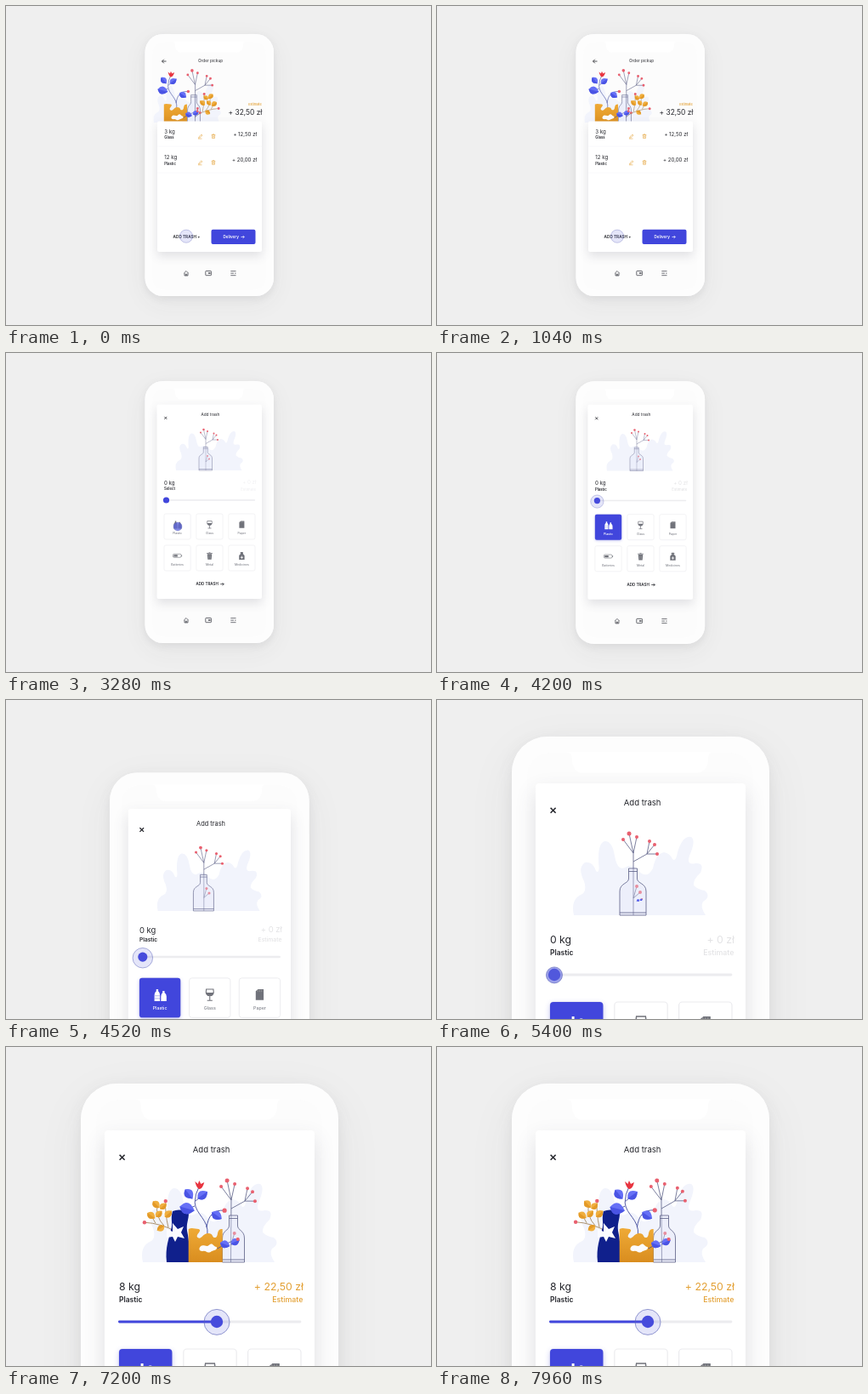
Write an HTML page with a canvas that moves like this. It is 500 px wide and 375 px high and loops after 8000 ms.

```html
<!DOCTYPE html>
<html lang="en">
<head>
<meta charset="utf-8">
<title>Add trash</title>
<style>
html, body { margin: 0; width: 100%; height: 100%; overflow: hidden; background: #efefef; }
canvas { display: block; width: 500px; height: 375px; }
</style>
</head>
<body>
<canvas id="stage"></canvas>
<script>
const LOOP = 8000;
const BLUE = '#4146dc', ORANGE = '#e3a034', INK = '#25262c', LINE = '#5b5f86', RED = '#e9606f';
const canvas = document.getElementById('stage');
const ctx = canvas.getContext('2d');
const dpr = Math.max(1, window.devicePixelRatio || 1);
canvas.width = 500 * dpr;
canvas.height = 375 * dpr;

let zoom = 1;

const clamp = v => Math.max(0, Math.min(1, v));
const lerp = (a, b, p) => a + (b - a) * p;
const ramp = (t, from, to) => clamp((t - from) / (to - from));
const quad = p => p < .5 ? 2 * p * p : 1 - 2 * (1 - p) * (1 - p);
const sine = p => (1 - Math.cos(Math.PI * p)) / 2;
const outCubic = p => 1 - Math.pow(1 - p, 3);

function group(x, y, scale, draw, alpha = 1, angle = 0) {
  if (alpha <= 0 || scale === 0) return;
  ctx.save();
  ctx.translate(x, y);
  ctx.rotate(angle);
  ctx.scale(scale, scale);
  ctx.globalAlpha *= alpha;
  draw();
  ctx.restore();
}

const faded = (alpha, draw) => group(0, 0, 1, draw, alpha);

function box(x, y, w, h, r, fill, stroke, width = .5) {
  ctx.beginPath();
  ctx.roundRect(x, y, w, h, r);
  if (fill) { ctx.fillStyle = fill; ctx.fill(); }
  if (stroke) { ctx.strokeStyle = stroke; ctx.lineWidth = width; ctx.stroke(); }
}

function shadowBox(x, y, w, h, r, fill, blur, dy, color) {
  ctx.save();
  ctx.shadowColor = color;
  ctx.shadowBlur = blur * zoom * dpr;
  ctx.shadowOffsetY = dy * zoom * dpr;
  box(x, y, w, h, r, fill);
  ctx.restore();
}

const card = (x, y, w) => shadowBox(x, y, w, 289 - y, 2, '#fff', 12, 5, 'rgba(70,70,90,.15)');

function dot(x, y, r, fill) {
  ctx.beginPath();
  ctx.arc(x, y, r, 0, Math.PI * 2);
  ctx.fillStyle = fill;
  ctx.fill();
}

function path(d, fill, stroke, width = .8) {
  const p = new Path2D(d);
  if (fill) { ctx.fillStyle = fill; ctx.fill(p); }
  if (stroke) { ctx.strokeStyle = stroke; ctx.lineWidth = width; ctx.stroke(p); }
}

function text(str, x, y, size, color = INK, align = 'left', weight = 400) {
  ctx.font = `${weight} ${size}px Inter, Roboto, sans-serif`;
  ctx.textAlign = align;
  ctx.textBaseline = 'middle';
  ctx.fillStyle = color;
  ctx.fillText(str, x, y);
}

// ---- illustration, ground at y = 0 ----

function leaf(x, y, angle, len, color, shade) {
  group(x, y, len / 10, () => {
    path('M-5 0Q-1 -7.5 5 0Q-1 7.5 -5 0Z', color);
    path('M-5 0Q-1 7.5 5 0Z', shade);
  }, 1, angle);
}

const blueLeaf = (x, y, a, len = 14) => leaf(x, y, a, len, '#6670f6', '#4a54e4');
const goldLeaf = (x, y, a, len = 11) => leaf(x, y, a, len, '#f0af3f', '#e39a28');

function foliage() {
  path('M-78 0Q-82 -18 -70 -24Q-62 -27 -66 -40Q-74 -56 -65 -62Q-56 -64 -52 -52' +
    'Q-47 -48 -49 -62Q-50 -84 -42 -87Q-33 -88 -30 -70Q-27 -52 -18 -56Q-8 -62 -2 -52' +
    'Q8 -42 15 -55Q18 -72 28 -74Q35 -73 38 -66Q42 -62 44 -74Q50 -94 60 -92Q66 -88 58 -70' +
    'Q54 -58 65 -61Q76 -62 71 -50Q62 -42 63 -35Q68 -30 76 -29Q84 -22 74 -16Q70 -10 77 0Z', '#f2f4fc');
}

function bottle(w) {
  const h = w / 2;
  path(`M-5 -55H5V-43C5 -37 ${h} -38 ${h} -28V0H${-h}V-28C${-h} -38 -5 -37 -5 -43Z` +
    `M-5 -51.5H5M${-h} -3H${h}`, 'rgba(226,230,250,.35)', LINE);
}

function berries() {
  path('M0 0V-73L-12 -89M0 -73L-5 -96M0 -73L4 -92M0 -63L16 -72L19 -87M16 -72L25 -83M16 -72L28 -72' +
    'M0 -20L4 -34M0 -20L8 -27', null, LINE);
  const spots = [[-12, -89], [-5, -96], [4, -92], [19, -87], [25, -83], [28, -72], [4, -34], [8, -27]];
  spots.forEach(([x, y], i) => dot(x, y, i === 1 ? 2.5 : 2, RED));
}

function blueBranch() {
  path('M2 -32C4 -50 -12 -56 -13 -70Q-13 -80 -8 -89M1 -41C3 -54 8 -62 22 -61M-13 -66L-20 -63M-12 -72L-5 -78', null, '#414a9c', .9);
  path('M-13 -95L-9.5 -92L-8 -96L-6 -92L-2 -94Q-4 -86 -8 -86Q-11 -87 -13 -95Z', '#e8343f');
  blueLeaf(-20, -80, .9);
  blueLeaf(-4, -79, -.6);
  blueLeaf(-22, -63, .25, 18);
  blueLeaf(13, -55, .6, 14);
  dot(22, -61, 2.6, RED);
}

function lowLeaves() {
  path('M14 -16Q23 -22 37 -27', null, '#414a9c', .8);
  blueLeaf(23, -21, .35, 12);
  blueLeaf(35, -24, -.4, 11);
  dot(38, -27, 2, RED);
}

function block() {
  const g = ctx.createLinearGradient(0, -40, 0, 0);
  g.addColorStop(0, '#efaa36');
  g.addColorStop(1, '#d98d1f');
  path('M-20 0V-39C-16 -41 -12 -39 -8 -39C-3 -37 -13 -32 -9 -29C-5 -26 -3 -34 3 -34' +
    'C10 -34 7 -28 12 -29C16 -31 12 -39 20 -39V0Z', g);
  path('M-7 -17C-4 -23 1 -17 4 -20C9 -24 8 -19 13 -18C15 -14 8 -14 6 -12C1 -10 1 -14 -3 -13C-6 -13 -8 -14 -7 -17Z', '#fbfbff');
}

function vase() {
  path('M-13 0C-15 -18 -10 -28 -8 -38C-5 -46 -9 -50 -6 -60Q3 -64 13 -58C13 -50 10 -46 11 -37C14 -24 14 -10 13 0Z', '#10208c');
  path('M-13 -39L-6 -36L-6 -46L0 -39L7 -42L4 -35L8 -28L0 -30L-3 -24L-6 -30L-13 -29Z', '#fbfbff');
}

function goldPlant() {
  path('M0 0Q-18 -10 -37 -11M-9 -5Q-13 -22 -12 -36M-14 -7Q-24 -17 -22 -33M-24 -10L-29 -19', null, '#9a7a4c');
  goldLeaf(-23, -32, .8);
  goldLeaf(-15, -30, -.7, 10);
  goldLeaf(-29, -19, .6);
  goldLeaf(-20, -21, -.8, 10);
  goldLeaf(-9, -21, -.7);
  goldLeaf(-18, -4, 2.6, 10);
  dot(-37, -11, 2.2, RED);
  dot(-12, -36, 2.2, RED);
}

// ---- phone ----

function phone() {
  shadowBox(163.5, 33, 151.5, 308, 21, '#fff', 30, 8, 'rgba(60,60,70,.06)');
  shadowBox(163.5, 33, 151.5, 308, 21, '#fdfdfd', 9, 3, 'rgba(100,100,110,.10)');
  box(172.5, 42.5, 133, 291, 14, '#fcfcfc');
  path('M196 42H281Q279 43 279 46Q279 54.5 271 54.5H206Q199 54.5 199 46Q199 43 196 42Z', '#fff');
}

function navBar() {
  path('M209.3 314.2L212 311.5L214.7 314.2M210 313.8V317H214V313.8M211.3 317V315.2H212.7V317', null, '#44464e', .75);
  box(234.8, 311.5, 6.6, 5.2, .6, null, '#44464e', .8);
  box(238, 313.3, 2.6, 1.5, .3, '#44464e');
  path('M264.3 311.7H270.5M264.3 314.2H268M269 314.2H270.5M264.3 316.7H270.5', null, '#44464e', .75);
}

function binIcon(x, y) {
  group(x, y, .9, () => path('M-2.5 -2H2.5M-1 -2V-2.8H1V-2M-1.9 -2L-1.6 2.5H1.6L1.9 -2M-.6 -.8V1.4M.6 -.8V1.4', null, ORANGE, .6));
}

function orderRow(y, weight, name, price) {
  text(weight, 186.3, y, 6.1);
  text(name, 186.3, y + 7.4, 4.2, INK, 'left', 600);
  text(price, 295, y + 3, 6.1, INK, 'right');
  path(`M226.5 ${y + 7.5}L227 ${y + 6}L230 ${y + 3.2}L231 ${y + 4.2}L228 ${y + 7}ZM226 ${y + 8.2}H230.5`, null, ORANGE, .55);
  binIcon(244, y + 5.5);
}

function orderArt(t) {
  const sway = Math.sin(t / 420) * .01;
  group(213, 137, .5, foliage);
  group(221, 142, .68, () => bottle(22));
  group(222.5, 145, .72, berries, 1, sway);
  group(225, 128, .68, () => { ctx.scale(-1, 1); goldPlant(); }, 1, sway);
  group(199.4, 142, .68, () => { blueBranch(); block(); lowLeaves(); });
}

function orderScreen(t) {
  path('M188.5 65H183.5M185.8 62.7L183.5 65L185.8 67.3', null, INK, .8);
  text('Order pickup', 240.5, 64.7, 4.75, INK, 'center');
  orderArt(t);
  text('Estimate', 300.8, 116.3, 3.8, ORANGE, 'right', 500);
  text('+ 32,50 zł', 301.3, 125.5, 8.4, INK, 'right');

  card(178, 135.5, 123);
  faded(1 - .75 * ramp(t, 1460, 1640), () => {
    orderRow(147.8, '3 kg', 'Glass', '+ 12,50 zł');
    orderRow(178.6, '12 kg', 'Plastic', '+ 20,00 zł');
    path('M178 165H301M178 196H301', null, '#f3f3f5', .5);
    const press = ramp(t, 1320, 1460);
    faded(press, () => box(187, 262.7, 51.5, 17.4, 2, BLUE));
    text('ADD TRASH +', 212.5, 271.5, 4.7, press > .5 ? '#fff' : INK, 'center', 600);
    box(241.5, 262.7, 52, 17.4, 2, BLUE);
    text('Delivery', 255.5, 271.5, 4.6, '#fff', 'left', 600);
    path('M276.5 271.5H280.3M278.7 269.9L280.3 271.5L278.7 273.1', null, '#fff', .7);
  });
}

const icons = [
  c => {
    path('M-4.2 5V.5Q-4.2 -1.5 -2.8 -2.5V-4H-1.3V-2.5Q0 -1.5 0 .5V5Z', c);
    path('M.8 5V1.5Q.8 -.5 2 -1.5V-2.8H3.5V-1.5Q5 -.5 5 1.5V5Z', c);
    path('M-4.2 1H0M-4.2 3H0', null, 'rgba(130,135,225,.8)', .5);
  },
  c => {
    path('M-2.7 -4H2.7Q3.6 1 0 1Q-3.6 1 -2.7 -4ZM0 1V4.5M-2 4.5H2', null, c, .7);
    path('M-2.9 -1.5H2.9Q2.6 1 0 1Q-2.6 1 -2.9 -1.5Z', c);
  },
  c => {
    path('M-3 4.2V-2.5L-1.2 -4H3V4.2Z', c);
    path('M-1.5 -3.5V-2M0 -3.5V-2M1.5 -3.5V-2', null, '#aaa', .4);
  },
  c => {
    box(-5.2, -2.2, 9.7, 4, 1.3, null, c, .6);
    box(-4.3, -1.3, 4.6, 2.2, .5, c);
    box(4.7, -1, .8, 1.7, .2, c);
  },
  c => {
    path('M-2.7 -2.3H2.7L2.2 4.3H-2.2Z', c);
    path('M-3.4 -3H3.4M-1 -3.8H1', null, c, .8);
    path('M-1 -1V3M1 -1V3', null, '#bbb', .4);
  },
  c => {
    box(-1.6, -4.5, 3.2, 2, .4, c);
    path('M-1.3 -2.4H1.3L3.2 -.5V4.5H-3.2V-.5Z', c);
    path('M-1.6 1.8H1.6M0 .2V3.4', null, '#fff', .8);
  }
];
const names = ['Plastic', 'Glass', 'Paper', 'Batteries', 'Metal', 'Medicines'];

function tile(i, chosen) {
  const x = 186 + (i % 3) * 37.9, y = i < 3 ? 189 : 226;
  box(x, y, 31.2, 30, 2, '#fff', '#ebebee', .6);
  if (i === 0) faded(chosen, () => shadowBox(x, y, 31.2, 30, 2, BLUE, 3, 1, 'rgba(65,70,220,.3)'));
  const on = i === 0 && chosen > .5;
  group(x + 15.6, y + 12.5, 1, () => icons[i](on ? '#fff' : '#70727a'));
  text(names[i], x + 15.6, y + 23, 3.45, on ? '#fff' : '#85878f', 'center', 500);
}

function scene(t) {
  const grow = outCubic(ramp(t, 1950, 2450));
  const first = sine(ramp(t, 5420, 5880));
  const second = sine(ramp(t, 6300, 6740));
  const leafGrow = outCubic(ramp(t, 5440, 5980));
  const lowGrow = lerp(.3 * ramp(t, 5360, 5400), 1, ramp(t, 5440, 5900));
  const vaseGrow = outCubic(ramp(t, 6340, 6760));
  const goldGrow = outCubic(ramp(t, 6560, 7200));
  const sway = Math.sin(t / 480) * .01 * ramp(t, 5600, 6000);

  foliage();
  group(-8 + 18 * first + 15.5 * second, 0, grow, berries, 1, sway);
  group(-8.5 + 21.5 * first + 15.5 * second, 0, 1, () => bottle(lerp(31, 26, first)));
  group(-37, 0, vaseGrow, () => {
    group(-2, -36, goldGrow, goldPlant, 1, -sway);
    vase();
  });
  const x = -19 + 14.7 * second;
  group(x, 0, leafGrow, blueBranch, 1, sway);
  group(x, 0, outCubic(ramp(t, 5420, 5800)), block);
  group(x + 14, -16, lowGrow, () => { ctx.translate(-14, 16); lowLeaves(); });
}

const dragAt = t => sine(ramp(t, 5420, 6720));
const knobX = t => 188.5 + 55 * dragAt(t);

function addScreen(t) {
  const chosen = ramp(t, 3380, 3540);
  const kg = Math.round(8 * dragAt(t));
  const price = kg ? (2.5 + 2.5 * kg).toFixed(2).replace('.', ',') : '0';
  const pale = chosen > .5 ? '#e3e3e5' : '#f1f1f3';
  const x = knobX(t);

  text('Add trash', 240.3, 72.2, 4.78, INK, 'center');
  path('M186.3 74.9L189.3 77.9M189.3 74.9L186.3 77.9', null, INK, .8);
  group(239, 138, .5, () => scene(t));
  text(`${kg} kg`, 186, 152.8, 6.1);
  text(chosen > .5 ? 'Plastic' : 'Select', 186, 160.2, 4.25, INK, 'left', 600);
  text(`+ ${price} zł`, 294.5, 152.6, 6.15, kg ? ORANGE : pale, 'right');
  text('Estimate', 294.2, 160.2, 4.4, kg ? ORANGE : pale, 'right', 500);

  box(185.5, 172.2, 107.7, 1.5, .7, '#ececef');
  box(185.5, 172.2, x - 185.5, 1.5, .7, BLUE);
  dot(x, 173, 3.6, BLUE);

  names.forEach((_, i) => tile(i, chosen));
  text('ADD TRASH', 223.5, 271.7, 4.5, INK, 'left', 600);
  path('M252.2 271.7H256.2M254.5 270L256.2 271.7L254.5 273.4', null, INK, .75);
}

// time, x, y, radius, strength
const touchKeys = [
  [0, 212, 270.7, 7.6, .17], [1250, 212, 270.7, 7.6, .17], [1400, 212, 270.7, 5.4, .6],
  [1580, 212, 270.7, 7.6, .2], [2500, 212, 270.7, 7.6, .17], [3080, 202, 204, 7.6, .17],
  [3260, 202, 204, 5, .75], [3320, 202, 204, 5, .75], [3460, 202, 204, 7.6, .17],
  [4060, 188.5, 174, 7.6, .17], [5180, 188.5, 173.2, 7.6, .17], [5370, 188.5, 173.2, 4.7, .6],
  [5430, 188.5, 173.2, 4.8, .6], [5580, 188.5, 173.2, 7.5, .17], [8000, 188.5, 173.2, 7.5, .17]
];

function touch(t) {
  let i = 0;
  while (i < touchKeys.length - 2 && touchKeys[i + 1][0] <= t) i++;
  const a = touchKeys[i], b = touchKeys[i + 1];
  const p = sine(ramp(t, a[0], b[0]));
  const [, x0, y, r, strength] = a.map((v, k) => lerp(v, b[k], p));
  const x = t > 5400 ? knobX(t) : x0;
  ctx.beginPath();
  ctx.arc(x, y, r, 0, Math.PI * 2);
  ctx.fillStyle = `rgba(92,100,220,${strength})`;
  ctx.fill();
  ctx.strokeStyle = 'rgba(95,102,185,.65)';
  ctx.lineWidth = .5;
  ctx.stroke();
}

function draw(t) {
  ctx.setTransform(dpr, 0, 0, dpr, 0, 0);
  ctx.fillStyle = '#efefef';
  ctx.fillRect(0, 0, 500, 375);

  zoom = 1 + quad(ramp(t, 4180, 4830));
  const pan = 165 * quad(ramp(t, 4180, 4660));
  ctx.translate(239, 188 + pan);
  ctx.scale(zoom, zoom);
  ctx.translate(-239, -188);

  phone();
  if (t < 1920) orderScreen(t);
  const cover = ramp(t, 1460, 1690);
  const top = lerp(135.5, 60.5, quad(ramp(t, 1490, 1910)));
  if (cover === 1) card(177.5, top, 123.5);
  else faded(cover, () => box(177.5, top, 124.5, 289 - top, 2, '#fff'));
  faded(ramp(t, 1860, 2240), () => addScreen(t));
  navBar();
  touch(t);
}

const start = performance.now();
function tick() {
  draw((performance.now() - start) % LOOP);
  requestAnimationFrame(tick);
}
tick();
</script>
</body>
</html>
```
